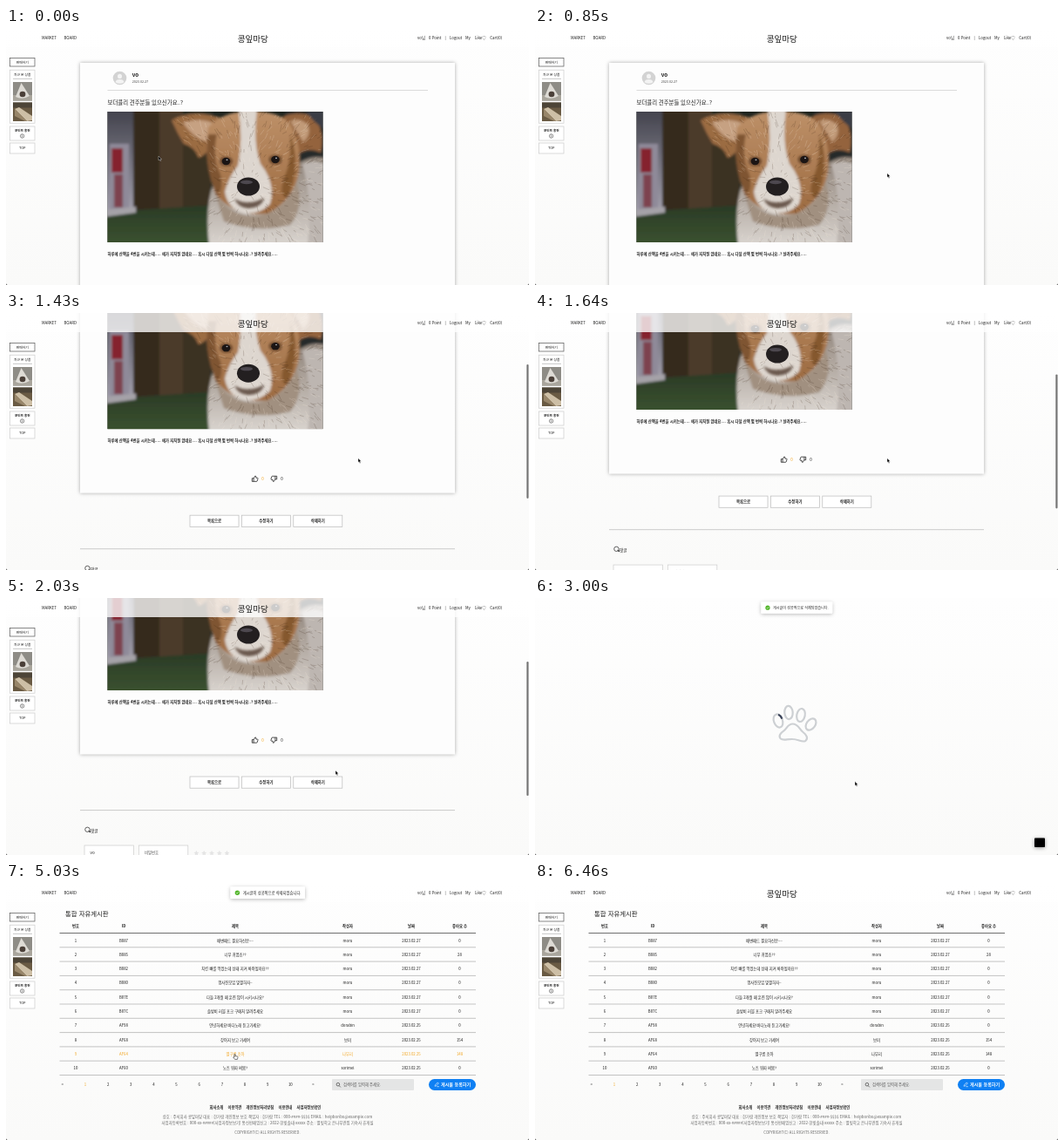
Recreate the animation shown at these times as an HTML page. Size 600x295 px, loop 6490 ms.

```html
<!DOCTYPE html>
<html lang="ko">
<head>
<meta charset="utf-8">
<title>자유게시판</title>
<style>
  html, body { margin: 0; width: 100%; height: 100%; overflow: hidden; background: #fcfcfc; }
  svg { display: block; width: 100vw; height: 100vh; }
  text { font-family: "Noto Sans CJK KR", "Noto Sans CJK", "Noto Sans", sans-serif; fill: #1c1c1c; white-space: pre; }
  .row.on text { fill: #f2a51f; }
  #post, #list, #load, #toast, #build { animation: 6490ms step-end infinite; }
  #post { animation-name: post; }
  #list { animation-name: list; }
  #load { animation-name: load; }
  #toast { animation-name: toast; animation-timing-function: ease-out; transform-origin: 300px 11px; }
  #build { animation-name: build; animation-timing-function: linear; }
  #trace { animation: trace 1298ms linear infinite; }
  @keyframes post { 0% { visibility: visible } 43.91%, 100% { visibility: hidden } }
  @keyframes list { 0% { visibility: hidden } 43.91%, 100% { visibility: visible } }
  @keyframes load { 0% { visibility: hidden } 43.91% { visibility: visible } 49.46%, 100% { visibility: hidden } }
  @keyframes toast {
    0%, 43.45% { opacity: 0; transform: translateY(-16px) scale(.955) }
    45.76%, 49.45% { opacity: 1; transform: scale(.955) }
    49.46%, 91.53% { opacity: 1; transform: none }
    94.45%, 100% { opacity: 0; transform: translateY(-12px) }
  }
  @keyframes build { 0%, 43.9% { opacity: 0 } 43.91%, 50.85% { opacity: 1 } 53.93%, 100% { opacity: 0 } }
  @keyframes trace { from { stroke-dashoffset: -51 } to { stroke-dashoffset: -151 } }
</style>
</head>
<body>
<svg id="stage" viewBox="0 0 600 295" preserveAspectRatio="none"></svg>
<script>
const LOOP = 6490, LIST_AT = 2850;
const ORANGE = '#f2a51f';
const $ = id => document.getElementById(id);

// Text placed by its vertical centre
const text = (x, y, str, size = 4.3, { w = 500, a = 'start', c = '' } = {}) =>
  `<text x="${x}" y="${y + size * .37}" font-size="${size}" font-weight="${w}" text-anchor="${a}"${c && ` style="fill:${c}"`}>${str}</text>`;
const mid = (x, y, str, size, o) => text(x, y, str, size, { a: 'middle', ...o });
const rect = (x, y, w, h, fill, more = '') => `<rect x="${x}" y="${y}" width="${w}" height="${h}" fill="${fill}" ${more}/>`;
const box = (x, y, w, h, line = '#ccc') => rect(x, y, w, h, '#fff', `stroke="${line}" stroke-width=".7"`);
const rule = (x1, x2, y, c, w = .6) => `<path d="M${x1} ${y}H${x2}" stroke="${c}" stroke-width="${w}"/>`;
const shape = (d, fill, more = '') => `<path d="${d}" fill="${fill}" ${more}/>`;
const oval = (x, y, rx, ry, fill, more = '') => `<ellipse cx="${x}" cy="${y}" rx="${rx}" ry="${ry}" fill="${fill}" ${more}/>`;
const fade = (id, from, to) => `<linearGradient id="${id}" x2="0" y2="1"><stop stop-color="${from}"/><stop offset="1" stop-color="${to}"/></linearGradient>`;

const BODY = 'M238 178Q228 205 233 250H370V150Q345 142 325 165Z';
const HEAD = 'M232 114Q246 97 276 96Q308 94 324 108Q340 130 336 166Q330 198 300 213Q262 218 240 190Q226 150 232 114Z';
const EAR_L = 'M190 106Q212 92 250 104L238 132Q230 146 221 149Q216 136 204 133Q196 120 190 106Z';
const EAR_R = 'M312 104Q336 92 356 104Q366 124 361 143Q346 136 334 146Z';

const defs = `<defs>
  ${fade('paper', '#fefefe', '#fafaf9')}${fade('fur', '#bd9068', '#9c6a40')}
  ${fade('panel', '#3f3f49', '#a3a0ad')}${fade('grass', '#2a3a26', '#3c5430')}${fade('chest', '#8f8379', '#dad5d0')}
  <clipPath id="photoBox"><rect x="116.5" y="96" width="247" height="150"/></clipPath>
  <clipPath id="dogShape">${[BODY, HEAD, EAR_L, EAR_R].map(d => `<path d="${d}"/>`).join('')}</clipPath>
  <filter id="soft" x="-10%" y="-10%" width="120%" height="120%"><feGaussianBlur stdDeviation="1.5"/></filter>
  <filter id="shade" x="-20%" y="-50%" width="140%" height="220%"><feDropShadow dx="0" dy="1" stdDeviation="2" flood-opacity=".28"/></filter>
</defs>`;

let seed = 7;
const rand = () => (seed = seed * 16807 % 2147483647) / 2147483647;

// Short hairs that point away from the nose
function hairs(count) {
  let dark = '', light = '';
  for (let i = 0; i < count; i++) {
    const x = 188 + rand() * 176, y = 96 + rand() * 150;
    const turn = Math.atan2(y - 180, x - 278) + rand() - .5, len = 3 + rand() * 6;
    const hair = `M${x.toFixed(1)} ${y.toFixed(1)}l${(Math.cos(turn) * len).toFixed(1)} ${(Math.sin(turn) * len).toFixed(1)}`;
    if (i % 2) dark += hair; else light += hair;
  }
  return `<g clip-path="url(#dogShape)" fill="none" stroke-width=".9" opacity=".2"><path d="${dark}" stroke="#35200f"/><path d="${light}" stroke="#fff3e4"/></g>`;
}

const eye = (x, y) => oval(x, y, 7.5, 5.5, '#6b462b', 'filter="url(#soft)"') + oval(x, y, 4.8, 4.2, '#1b1514') + oval(x + 1, y - 1.6, 1, .8, '#a9adb5');
const dog = `<g clip-path="url(#photoBox)">${rect(116, 96, 248, 150, '#20251f')}<g filter="url(#soft)">
  ${rect(110, 90, 36, 122, 'url(#panel)')}${rect(146, 90, 30, 122, '#34291f')}${rect(176, 90, 27, 118, '#4b3a2b')}
  ${rect(203, 128, 32, 82, '#3a3022')}${rect(203, 90, 34, 38, '#2a2d27')}
  ${rect(119, 133, 22, 77, '#8f8a99')}${rect(121, 138, 13, 28, '#85202f')}${rect(124, 168, 10, 38, '#7d4250')}
  ${shape('M110 213L150 209L240 203V252H110Z', 'url(#grass)')}${shape('M112 209L149 205V212L112 217Z', '#a5a2a8')}
  ${rect(320, 90, 50, 80, '#252a2c')}
  ${shape(BODY, 'url(#chest)')}
  ${shape('M340 156Q354 150 370 158V250H346Q352 200 340 156Z', '#bdb6b1')}
  ${shape('M240 190Q262 222 296 214Q322 206 334 178Q342 208 326 226Q288 236 250 222Z', '#a19080')}
  ${shape(EAR_L, '#9b6c43')}${shape('M203 109Q222 102 240 110L229 130Q216 127 203 109Z', '#c6a182')}
  ${shape(EAR_R, '#94643c')}${shape('M326 107Q338 102 347 112Q350 124 341 131Z', '#c19a78')}${shape('M344 96L366 96V116Q356 112 344 96Z', '#3a3c44')}
  ${shape(HEAD, 'url(#fur)')}
  ${shape('M232 122Q226 156 242 192Q250 186 246 168Q236 150 242 122Z', '#7f5533')}
  ${shape('M326 122Q340 160 322 196Q312 190 320 170Q328 150 326 122Z', '#85592f')}
  ${shape('M267 94Q278 90 288 94Q283 132 292 156Q310 178 303 202Q292 214 274 213Q254 208 251 188Q256 170 266 158Q272 130 267 94Z', '#ddd6cf')}</g>
  ${hairs(700)}
  ${shape('M262 196Q278 205 296 195Q294 206 278 207Q266 206 262 196Z', '#6a584d', 'filter="url(#soft)"')}
  ${oval(278, 182, 13, 10.5, '#231f20')}${oval(276, 177, 7, 2.2, '#4d484f')}
  ${eye(252.5, 153)}${eye(309, 151)}
</g>`;

const thumb = (x, y, turn) => `<g transform="translate(${x} ${y})${turn ? ' rotate(180 0 0)' : ''}" fill="none" stroke="#222" stroke-width=".8" stroke-linejoin="round">
  <path d="M-3.2-.4H-1.4V3.2H-3.2ZM-1.4-.2L.4-3.2Q1.7-3.2 1.4-.9H3.1Q3.7-.8 3.4.4L2.7 2.7Q2.5 3.2 2 3.2H-1.4"/></g>`;
const star = x => shape(`M${x} 429.8l.9 2 2.1.2-1.6 1.4.5 2.1-1.9-1.1-1.9 1.1.5-2.1-1.6-1.4 2.1-.2Z`, '#e4e4e4');

const post = `<g id="post"><g id="scroll">
  ${rect(85, 40, 430, 279.5, '#fdfdfd', 'style="filter:drop-shadow(0 .5px 2.2px #0005)"')}
  ${oval(130.5, 57.5, 7.8, 7.8, '#d3d3d3')}${oval(130.5, 55.4, 2.5, 2.6, '#f3f3f3')}${shape('M125.5 62.3Q126 58.9 130.5 58.9T135.5 62.3Q130.5 65.3 125.5 62.3Z', '#f3f3f3')}
  ${text(144.7, 54, 'vo', 6.2, { w: 700 })}${text(144.7, 61.3, '2023.02.27', 3.7, { c: '#444' })}
  ${rule(116.5, 484, 71.5, '#c4c4c4')}
  ${text(116.5, 85.5, '보더콜리 견주분들 있으신가요..?', 6.4)}
  ${dog}
  ${text(116.5, 259, '하루에 산책을 4번을 시키는데..... 애가 지치질 않네요.... 혹시 다덜 산책 몇 번씩 하시나요..? 살려주세요.....', 4.35, { w: 700 })}
  ${thumb(285.5, 303)}${mid(294.5, 303.3, '0', 4.4, { c: ORANGE })}${thumb(307.5, 303.3, true)}${mid(316.5, 303.3, '0', 4.4)}
  ${['목록으로', '수정하기', '삭제하기'].map((s, i) => box(211 + i * 59.4, 345, 56, 13.2, '#bbb') + mid(239 + i * 59.4, 351.5, s, 4.4, { w: 700 })).join('')}
  ${rule(85, 515, 383.6, '#aaa')}
  <circle cx="93.4" cy="405.8" r="2.7" fill="none" stroke="#222" stroke-width=".7"/>${shape('M94 407.5h3v2Z', '#222')}
  ${text(97, 407.6, '댓글', 4.6)}
  ${box(90, 424, 56.5, 17)}${text(96.5, 432, 'vo', 4.6)}
  ${box(152.3, 424, 56.5, 17)}${text(159, 432, '비밀번호', 4.4, { c: '#555' })}
  ${[218.4, 227.2, 236, 244.8, 253.4].map(star).join('')}
</g></g>`;

const COLS = [80, 135, 263, 392, 465, 520.5], TOP = 57.5, STEP = 16.3;
const cells = (y, vals, o) => vals.map((v, i) => mid(COLS[i], y, v, 4.3, o)).join('');
const posts = [
  ['B087', '배변패드 필요하신분~~', 'moru', 27, 0],
  ['B085', '너무 귀엽죠??', 'moru', 27, 28],
  ['B082', '치킨 뼈를 먹었는데 상태 지켜 봐야될까요??', 'moru', 27, 0],
  ['B080', '멍사진모임 맞팔하자~', 'moru', 27, 0],
  ['B07E', '다들 2개월 때 훈련 많이 시키시나요?', 'moru', 27, 0],
  ['B07C', '솔방비 러블 포크 구매처 알려주세요', 'moru', 27, 0],
  ['AF98', '안녕하세요!바다노래 듣고가세요!', 'dorabin', 25, 0],
  ['AF68', '강아지 보고 가세여', '보미', 25, 154],
  ['AF64', '별구름 조아', '나무리', 25, 148],
  ['AF60', '노즈 워파 써봄?', 'sorimel', 25, 0],
];
const rows = posts.map(([id, title, who, day, likes], i) =>
  `<g class="row">${cells(TOP + STEP * (i + .52), [i + 1, id, title, who, '2023.02.' + day, likes])}</g>` +
  rule(61.5, 539, TOP + STEP * (i + 1), '#888', .5)).join('');
const pager = ['&lt;', 1, 2, 3, 4, 5, 6, 7, 8, 9, 10, '&gt;'].map((s, i) =>
  mid(64.8 + i * 26.15, 231.5, s, 4.3, { c: i == 1 ? ORANGE : '' })).join('');
const links = [[233.5, '회사소개'], [254.5, '이용약관'], [275.5, '개인정보처리방침'], [312.5, '이용안내'], [333.5, '사업자정보확인']];
const GREY = { c: '#666' };

const list = `<g id="list">
  ${text(68, 35, '통합 자유게시판', 7.4)}
  ${cells(49.5, ['번호', 'ID', '제목', '작성자', '날짜', '좋아요 수'], { w: 700 })}
  ${rule(61.5, 539, TOP, '#333', .7)}${rows}${pager}
  ${rect(374, 225, 94, 13, '#e4e5e5', 'rx="1"')}
  <path d="M382.3 232.8l1.6 1.6M382.7 231.2a1.8 1.8 0 1 1-3.6 0a1.8 1.8 0 1 1 3.6 0" fill="none" stroke="#222" stroke-width=".6"/>
  ${text(387, 231.5, '검색어를 입력해 주세요.', 4.3, { c: '#555' })}
  ${rect(485, 225, 54, 13, '#0f80f3', 'rx="6.5"')}
  <path d="M492 233.3l.4-1.5 2.9-2.9 1.1 1.1-2.9 2.9ZM494.3 233.7h2.6" fill="none" stroke="#fff" stroke-width=".6"/>
  ${text(499, 231.4, '게시물 등록하기', 5.1, { w: 700, c: '#fff' })}
  ${links.map(([x, s]) => text(x, 257, s, 4.3, { w: 700 })).join('')}
  ${mid(300, 268, '상호 : 주식회사 콩잎마당 대표 : 한가람 개인정보 보호 책임자 : 한가람 TEL : 000-####-$$$$ EMAIL : helpboribo@example.com', 4.4, GREY)}
  ${mid(300, 275, '사업자등록번호 : 000-xx-#####[사업자정보보기] 통신판매업신고 : 2022-한빛솔내-xxxxx 주소 : 별빛학교 은나무관집 기숙사 휴게실', 4.45, GREY)}
  ${mid(300, 286.5, 'COPYRIGHT(C) ALL RIGHTS RESERVED.', 4.2, GREY)}
</g>`;

const nav = [[41, 'MARKET'], [66.5, 'BOARD'], [472, 'vo님'], [485, '0 Point'], [503.5, '|'], [509, 'Logout'], [527, 'My'], [538, 'Like♡'], [555.3, 'Cart(0)']];
const frame = `<g>
  ${rect(0, 0, 600, 22, '#fff', 'opacity=".78"')}
  ${nav.map(([x, s]) => text(x, 11.5, s, 4.35)).join('')}
  ${mid(283.3, 12, '콩잎마당', 9.6, { w: 300 })}
  ${box(4.5, 34.5, 28.5, 9.5, '#555')}${mid(18.8, 39.3, '판매하기', 3.9)}
  ${box(4.5, 48.2, 28.5, 61)}${mid(18.8, 53.6, '최근 본 상품', 3.8)}${rule(8, 30, 58.3, '#888', .5)}
  ${rect(8, 62, 22, 21.5, '#8e8c86')}${rect(8, 77, 22, 6.5, '#a9a59c')}${shape('M17.5 63L27 78Q19 83 11 79Z', '#dedbd5')}${oval(19, 76, 3.4, 3.2, '#4b4039')}
  ${rect(8, 85.5, 22, 21.5, '#6a5b44')}${rect(8, 85.5, 22, 6, '#4d4538')}${shape('M10 93L15 91L30 101V106L24 107Z', '#cdbfa6')}${shape('M10 93V101L22 107H24Z', '#98866a')}
  ${box(4.5, 113, 28.5, 16)}${mid(18.8, 117.6, '포인트 충전', 3.6, { w: 700 })}
  <circle cx="18.6" cy="124" r="2.2" fill="none" stroke="#222" stroke-width=".5"/>${mid(18.6, 124, '$', 3)}
  ${box(4.5, 132, 28.5, 12)}${mid(18.8, 138, 'TOP', 3.9)}
  ${rect(597.3, 0, 2.2, 154, '#757575', 'id="bar" rx="1.1"')}
</g>`;

const toe = (x, y, rx, ry, turn, more = '') => oval(x, y, rx, ry, 'none', `transform="rotate(${turn} ${x} ${y})" ${more}`);
const load = `<g id="load">${rect(0, 0, 600, 295, 'url(#paper)')}
  <g stroke="#cdd0d3" stroke-width="2.2" fill="none">
    ${toe(279, 141, 5, 7.8, -20)}${toe(291, 131.5, 4.7, 7.6, -4)}${toe(305, 134.5, 4.7, 7.6, 12)}${toe(316.5, 145, 5, 7.4, 36)}
    <path d="M295.5 144.5C302 144.5 303 150 307 153.5C312 157.5 313.5 161 310.5 163.8C307 166.5 302 162 295.5 162C289 161.8 284.5 164 281.8 161.5C279 158.5 281.5 155 285.5 152.3C289.5 149.5 290 144.5 295.5 144.5Z"/>
    ${toe(279, 141, 5, 7.8, -20, 'id="trace" pathLength="100" stroke="#3a4258" stroke-dasharray="16 84"')}
  </g></g>`;

const build = `<g id="build">${rect(573, 275.5, 12, 10.5, '#000', 'rx=".8" style="filter:drop-shadow(0 1px 2px #0006)"')}</g>`;
const toast = `<g id="toast">${rect(257.5, 4.2, 85.5, 13.8, '#fff', 'rx="1" filter="url(#shade)"')}
  <circle cx="265.4" cy="11.2" r="2.7" fill="#52b52a"/><path d="M264.2 11.2l.9 1 1.6-2" fill="none" stroke="#fff" stroke-width=".6"/>
  ${text(271.7, 11, '게시글이 성공적으로 삭제되었습니다.', 4.3)}</g>`;
const pointer = `<g id="pointer">
  <path id="arrow" d="M0 0V4.9L1.1 3.9L1.9 5.7L2.8 5.3L2 3.6H3.5Z" fill="#000" stroke="#fff" stroke-width=".35"/>
  <path id="hand" d="M0 .6Q.5-.4 1 .6V2.6L3.5 3.1Q4.2 3.4 4 4.2L3.4 6.4H.6L-1.3 4Q-1.1 3.2 0 4Z" fill="#fff" stroke="#111" stroke-width=".55"/></g>`;
const corners = shape('M0 293A2 2 0 0 0 2 295H0ZM600 293A2 2 0 0 1 598 295H600Z', '#333');

$('stage').innerHTML = defs + rect(0, 0, 600, 295, 'url(#paper)') + post + list + frame + load + build + toast + pointer + corners;

// Pointer stops: [ms, x, y]
const path = [
  [0, 175, 147], [490, 175, 147], [810, 404, 166.7], [1880, 404, 166.7], [2030, 378, 198], [2300, 367, 210.6],
  [3300, 367, 210.6], [3900, 330, 170], [4300, 290, 118], [4550, 285, 150], [5000, 262, 196], [5210, 262, 196],
  [5500, 300, 68], [5880, 330, 212], [6200, 420, 230], [LOOP, 420, 230],
];
const clamp = v => Math.min(1, Math.max(0, v));
const smooth = u => u * u * (3 - 2 * u);
function pointAt(t) {
  const i = path.findIndex(k => k[0] > t);
  const [t0, x0, y0] = path[i - 1], [t1, x1, y1] = path[i];
  const u = smooth((t - t0) / (t1 - t0));
  return [x0 + (x1 - x0) * u, y0 + (y1 - y0) * u];
}

const rowEls = [...document.querySelectorAll('.row')];
let start;
function draw(now) {
  start ??= now;
  const t = (now - start) % LOOP;
  const scroll = 140 * (1 - (1 - clamp((t - 960) / 840)) ** 2);
  $('scroll').setAttribute('transform', `translate(0 ${-scroll})`);
  $('bar').setAttribute('y', scroll * .522);
  $('bar').setAttribute('opacity', t < 960 ? 0 : clamp((2500 - t) / 200));

  const [x, y] = pointAt(t);
  const listed = t >= 3210;
  const hit = listed && x > 61 && x < 539 ? Math.floor((y - TOP) / STEP) : -1;
  rowEls.forEach((el, i) => el.classList.toggle('on', i === hit));
  const onDelete = t < LIST_AT && scroll > 139 && x > 330 && x < 386 && y > 205 && y < 218;
  const hand = onDelete || (hit >= 0 && hit < rowEls.length);
  $('hand').style.display = hand ? '' : 'none';
  $('arrow').style.display = hand ? 'none' : '';
  $('pointer').style.display = t < 6250 ? '' : 'none';
  $('pointer').setAttribute('transform', `translate(${x} ${y})`);
  requestAnimationFrame(draw);
}
requestAnimationFrame(draw);
</script>
</body>
</html>
```
